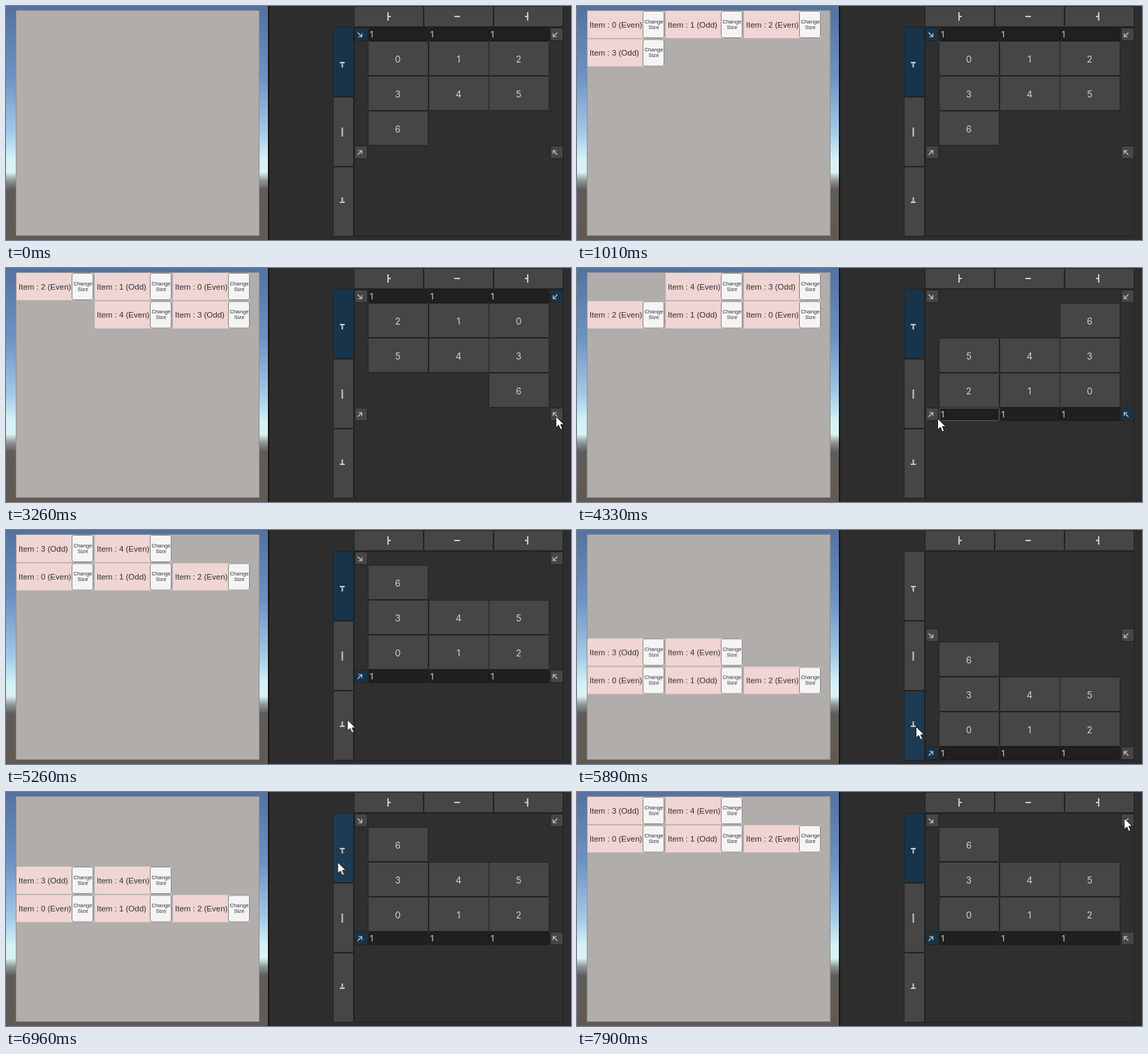
Animation, 809 px wide and 335 px high, one loop 8000 ms. Source, as an HTML page:

```html
<!DOCTYPE html>
<html lang="en">
<head>
<meta charset="utf-8">
<title>Grid layout corners and alignment</title>
<style>
html, body { margin: 0; width: 100%; height: 100%; overflow: hidden; background: #2d2d2d; }
svg { display: block; width: 809px; height: 335px; }
.item text { font: 11.5px "Liberation Sans", Arial, sans-serif; fill: #323232; }
.item .small { font-size: 7.7px; text-anchor: middle; }
.num { font: 13px Inter, Roboto, sans-serif; fill: #d2d2d2; }
.mid { text-anchor: middle; }
.btn { fill: #464646; stroke: #222; }
.sel { fill: #18344a; stroke: #222; }
.hot { fill: #1d3c54; stroke: #222; }
.field { fill: #202020; stroke: #191919; }
.icon { fill: none; stroke: #c8c8c8; stroke-width: 2; }
.thin { stroke-width: 1.2; }

#list { animation: list 8s linear infinite; }
#grid { animation: grid 8s linear infinite; }
#cursor { animation: cursor 8s ease-in-out infinite; }

@keyframes list {
  0%, 68.475% { transform: translateY(0); }
  70.625% { transform: translateY(79px); }
  73.625% { transform: translateY(148px); animation-timing-function: ease-out; }
  75.8% { transform: translateY(176px); animation-timing-function: ease-out; }
  79.3%, 85.6% { transform: translateY(121px); }
  87% { transform: translateY(100px); }
  92.25% { transform: translateY(24px); animation-timing-function: ease-out; }
  94.5%, 100% { transform: translateY(0); }
}
@keyframes grid {
  0%, 69.5% { transform: translateY(0); }
  70.625% { transform: translateY(96px); }
  71.25%, 76.1% { transform: translateY(110px); }
  77.7%, 85.25% { transform: translateY(55px); }
  86.6%, 100% { transform: translateY(0); }
}
@keyframes cursor {
  0%, 21.5% { transform: translate(640px, 70px); }
  26.25%, 32% { transform: translate(784px, 42px); }
  38.75%, 41% { transform: translate(787px, 212px); }
  42.6%, 46.25% { transform: translate(793px, 212px); }
  54.1% { transform: translate(516px, 215px); }
  56%, 60.9% { transform: translate(508px, 212px); }
  67.5%, 73.75% { transform: translate(485px, 281px); }
  75.75%, 82% { transform: translate(484px, 175px); }
  84.9%, 92.5% { transform: translate(474.5px, 100px); }
  98.5%, 100% { transform: translate(783px, 37px); }
}
</style>
</head>
<body>
<svg id="stage" viewBox="0 0 809 335" xmlns="http://www.w3.org/2000/svg"></svg>
<script>
const LOOP = 8000;
const rules = [];

// Wraps markup so that it is visible only during the given [from, to] spans in ms.
function during(spans, body) {
  const name = 'show' + rules.length;
  const pct = t => (t / LOOP * 100).toFixed(3) + '%';
  const stops = spans[0][0] > 0 ? ['0%{opacity:0}'] : [];
  for (const [from, to] of spans) {
    stops.push(pct(from) + '{opacity:1}');
    stops.push(pct(to) + `{opacity:${to < LOOP ? 0 : 1}}`);
  }
  rules.push(`@keyframes ${name}{${stops.join('')}}`);
  return `<g style="animation:${name} 8s step-end infinite">${body}</g>`;
}

const times = (n, fn) => Array.from({ length: n }, (_, i) => fn(i)).join('');
const box = (cls, x, y, w, h, r = 2) =>
  `<rect class="${cls}" x="${x + .5}" y="${y + .5}" width="${w - 1}" height="${h - 1}" rx="${r}"/>`;
const icon = (d, cls = '') => `<path class="icon ${cls}" d="${d}"/>`;

// Start corners in order: top left, top right, bottom right, bottom left.
const flipX = corner => corner === 1 || corner === 2;
const flipY = corner => corner > 1;
function place(i, corner, rows) {
  const col = i % 3, row = Math.floor(i / 3);
  return [flipX(corner) ? 2 - col : col, flipY(corner) ? rows - 1 - row : row];
}

function item(i, corner) {
  const [col, row] = place(i, corner, 2);
  return `<g class="item" transform="translate(${15 + col * 112} ${7 + row * 40.5})">
    <rect width="110" height="39" fill="#efd5d3"/>
    <rect x="79.5" y=".5" width="30" height="38" rx="3" fill="#f5f4f4" stroke="#858282"/>
    <text x="3" y="23.5">Item : ${i} (${i % 2 ? 'Odd' : 'Even'})</text>
    <text class="small" x="95" y="17.5">Change</text>
    <text class="small" x="95" y="25.7">Size</text></g>`;
}

const cellX = [519, 606, 692];
function grid(corner) {
  const fieldY = flipY(corner) ? 200 : 31;
  const corners = times(4, k => {
    const x = flipX(k) ? 779 : 499, y = flipY(k) ? 200 : 31;
    const cx = flipX(k) ? 786.5 : 506.5, cy = y + 10;
    return box(k === corner ? 'sel' : 'btn', x, y, 19, 19) +
      `<g transform="translate(${cx} ${cy}) rotate(${k * 90})">` +
      icon('M-3-3L3 3M3-2V3H-2', 'thin') + '</g>';
  });
  const fields = times(3, c => box('field', cellX[c], fieldY, 86, 19) +
    `<text class="num" x="${521 + c * 86.5}" y="${fieldY + 14}" style="font-size:12px">1</text>`);
  const cells = times(7, i => {
    const [col, row] = place(i, corner, 3);
    const x = cellX[col], y = 51 + row * 50;
    return box('btn', x - 1, y - 1, 87, 50) +
      `<text class="num mid" x="${x + 42}" y="${y + 29.5}">${i}</text>`;
  });
  return corners + fields + cells;
}

const listCuts = [0, 2410, 3560, 4500, LOOP];
const gridCuts = [0, 2490, 3640, 4580, LOOP];
const added = [150, 460, 690, 1010, 1470];

const lists = times(4, k => during([[listCuts[k], listCuts[k + 1]]],
  times(5, i => k ? item(i, k) : during([[added[i], LOOP]], item(i, k)))));
const grids = times(4, k => during([[gridCuts[k], gridCuts[k + 1]]], grid(k)));

const side = (cls, i) => box(cls, 468, 30 + i * 100, 30, 100);
const selected =
  during([[0, 5520], [7440, LOOP]], side('sel', 0)) +
  during([[6800, 7440]], side('hot', 0)) +
  during([[6080, 6800]], side('hot', 1)) +
  during([[5520, 6080]], side('hot', 2));

const clicks = [[2250, 2490], [3480, 3640], [4480, 4640], [5440, 5620], [6050, 6200], [6780, 6930]];
const pointer = during([[1720, LOOP]], `<g id="cursor">
  ${during(clicks, '<circle r="12" fill="#c9c01c" fill-opacity=".82"/>')}
  <path d="M.5.5V16.6L4.3 13 7 19.3 9.8 18.1 7.1 12H12Z" fill="#fff" stroke="#111" stroke-width=".9"/></g>`);

const sky = [[0, '#54719f'], [100, '#6c92c4'], [180, '#a2c9e7'], [218, '#d2f1f6'],
  [238, '#dcf2f3'], [250, '#8d9596'], [263, '#5f5c59'], [335, '#625a52']];

document.getElementById('stage').innerHTML = `
  <defs><linearGradient id="sky" x2="0" y2="1">
    ${sky.map(([y, c]) => `<stop offset="${y / 335}" stop-color="${c}"/>`).join('')}
  </linearGradient></defs>
  <rect width="376" height="335" fill="url(#sky)"/>
  <rect x="14.5" y="6.5" width="348" height="322" fill="#b0adab" stroke="#918f8e"/>
  <g id="list">${lists}</g>
  <rect x="375" width="434" height="335" fill="#2d2d2d"/>
  <rect x="375" width="2" height="335" fill="#151515"/>
  <rect x="498.5" y="30.5" width="299" height="299" fill="#2f2f2f" stroke="#222"/>
  ${times(3, i => box('btn', 498 + i * 100, 0, 100, 30) + side('btn', i))}
  ${selected}
  ${icon('M547 9V21M547 15H551')}${icon('M642 15H650')}${icon('M747 9V21M747 15H743')}
  ${icon('M478 81H485M481.5 81V88')}${icon('M481.5 174V187')}${icon('M478 281H485M481.5 274V281')}
  <g id="grid">${grids}</g>
  ${during([[4250, 4430]], '<rect x="519.5" y="200.5" width="85" height="18" rx="2" fill="none" stroke="#5c5c5c"/>')}
  ${pointer}`;

const style = document.createElement('style');
style.textContent = rules.join('\n');
document.head.append(style);
</script>
</body>
</html>
```
